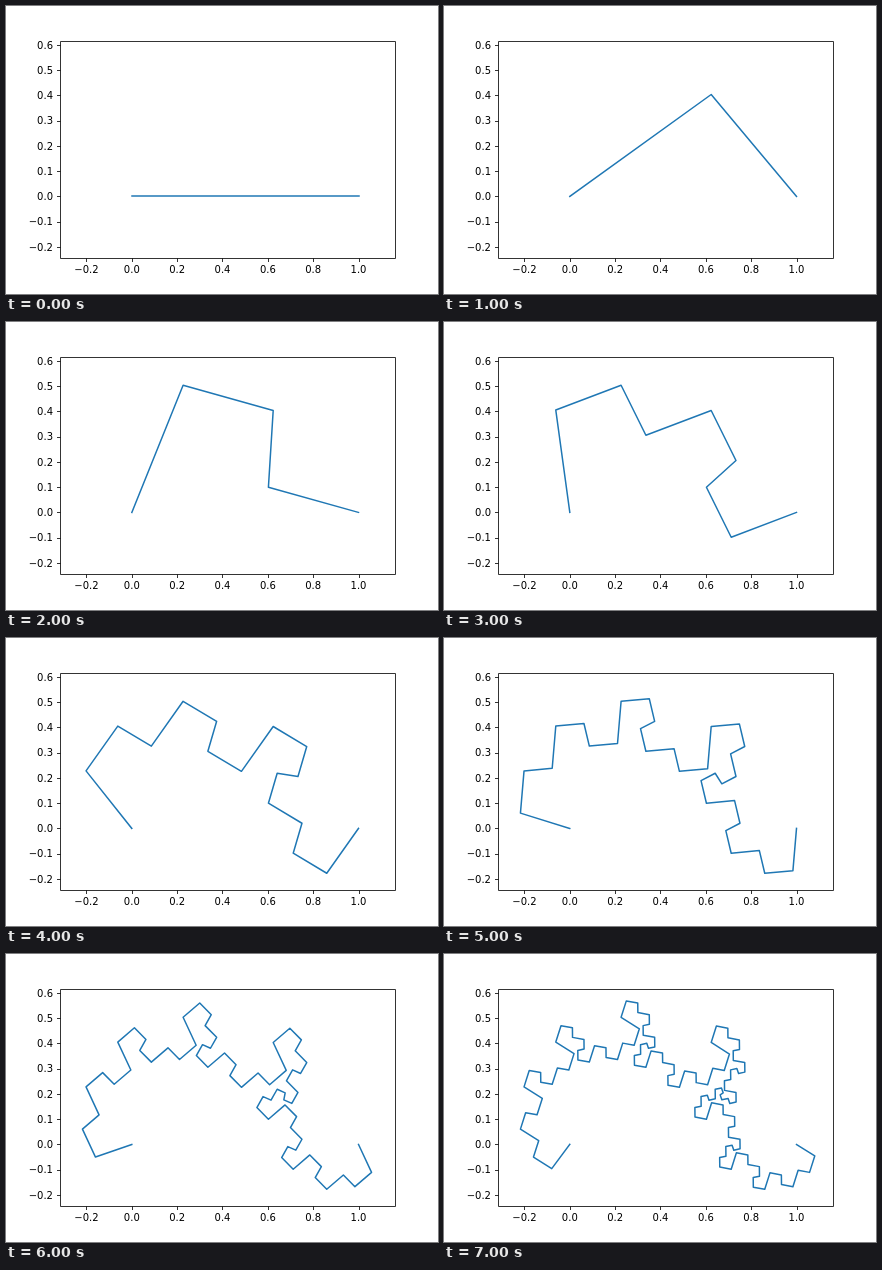
Recreate the animation shown at these times as an HTML page. Size 432x288 px, loop 8000 ms.

```html
<!DOCTYPE html>
<html lang="en">
<head>
<meta charset="utf-8">
<title>Folding curve</title>
<style>
  html, body { margin: 0; width: 100%; height: 100%; overflow: hidden; background: #fff; }
  svg { display: block; width: 432px; height: 288px; }
  text { font: 10px "DejaVu Sans", sans-serif; }
  .axes { fill: none; stroke: #000; stroke-width: .8; }
  .curve {
    fill: none; stroke: #1f77b4; stroke-width: 1.5;
    stroke-linecap: square; stroke-linejoin: round;
    visibility: hidden;
    animation: show 8s step-end infinite;
  }
  @keyframes show {
    0% { visibility: visible; }
    12.5%, 100% { visibility: hidden; }
  }
</style>
</head>
<body>
<svg id="plot" viewBox="0 0 432 288"></svg>
<script>
const plot = document.getElementById('plot');
const LEVELS = 8;

const px = x => 125.81 + 226.7 * x;
const py = y => 190.42 - 252.7 * y;
const snap = v => Math.round(v) + 0.5;

function add(tag, attrs, text = '') {
  const el = document.createElementNS('http://www.w3.org/2000/svg', tag);
  for (const key in attrs) el.setAttribute(key, attrs[key]);
  el.textContent = text;
  plot.appendChild(el);
  return el;
}

// Golden dragon: the corner of a triangle with sides r, r², 1
const phi = (1 + Math.sqrt(5)) / 2;
const r = Math.pow(1 / phi, 1 / phi);
const cx = (1 + r ** 2 - r ** 4) / 2;
const cy = Math.sqrt(r ** 2 - cx ** 2);

// Put a corner on each segment, reading every second one backwards
function fold(pts) {
  const out = [pts[0]];
  for (let i = 1; i < pts.length; i++) {
    const [a, b] = i % 2 ? [pts[i - 1], pts[i]] : [pts[i], pts[i - 1]];
    const dx = b[0] - a[0], dy = b[1] - a[1];
    out.push([a[0] + cx * dx - cy * dy, a[1] + cx * dy + cy * dx], pts[i]);
  }
  return out;
}

function drawCurves() {
  let pts = [[0, 0], [1, 0]];
  for (let k = 0; k < LEVELS; k++) {
    // the flat first line sits on whole pixels
    const fit = k ? v => v.toFixed(2) : Math.round;
    const points = pts.map(([x, y]) => fit(px(x)) + ',' + fit(py(y))).join(' ');
    const line = add('polyline', { class: 'curve', points });
    line.style.animationDelay = -((LEVELS - k) % LEVELS) + 's';
    pts = fold(pts);
  }
}

function drawAxes() {
  const label = v => v.toFixed(1).replace('-', '\u2212');
  let d = 'M54.5 35.5H389.5V252.5H54.5Z';
  for (let i = -1; i <= 5; i++) {
    const x = px(i / 5);
    d += `M${snap(x)} 252.5v3.5`;
    add('text', { x, y: 267, 'text-anchor': 'middle' }, label(i / 5));
  }
  for (let i = -2; i <= 6; i++) {
    const y = py(i / 10);
    d += `M54.5 ${snap(y)}h-3.5`;
    add('text', { x: 47, y: Math.round(y + 3.8), 'text-anchor': 'end' }, label(i / 10));
  }
  add('path', { class: 'axes', d });
}

drawCurves();
drawAxes();
</script>
</body>
</html>
```
